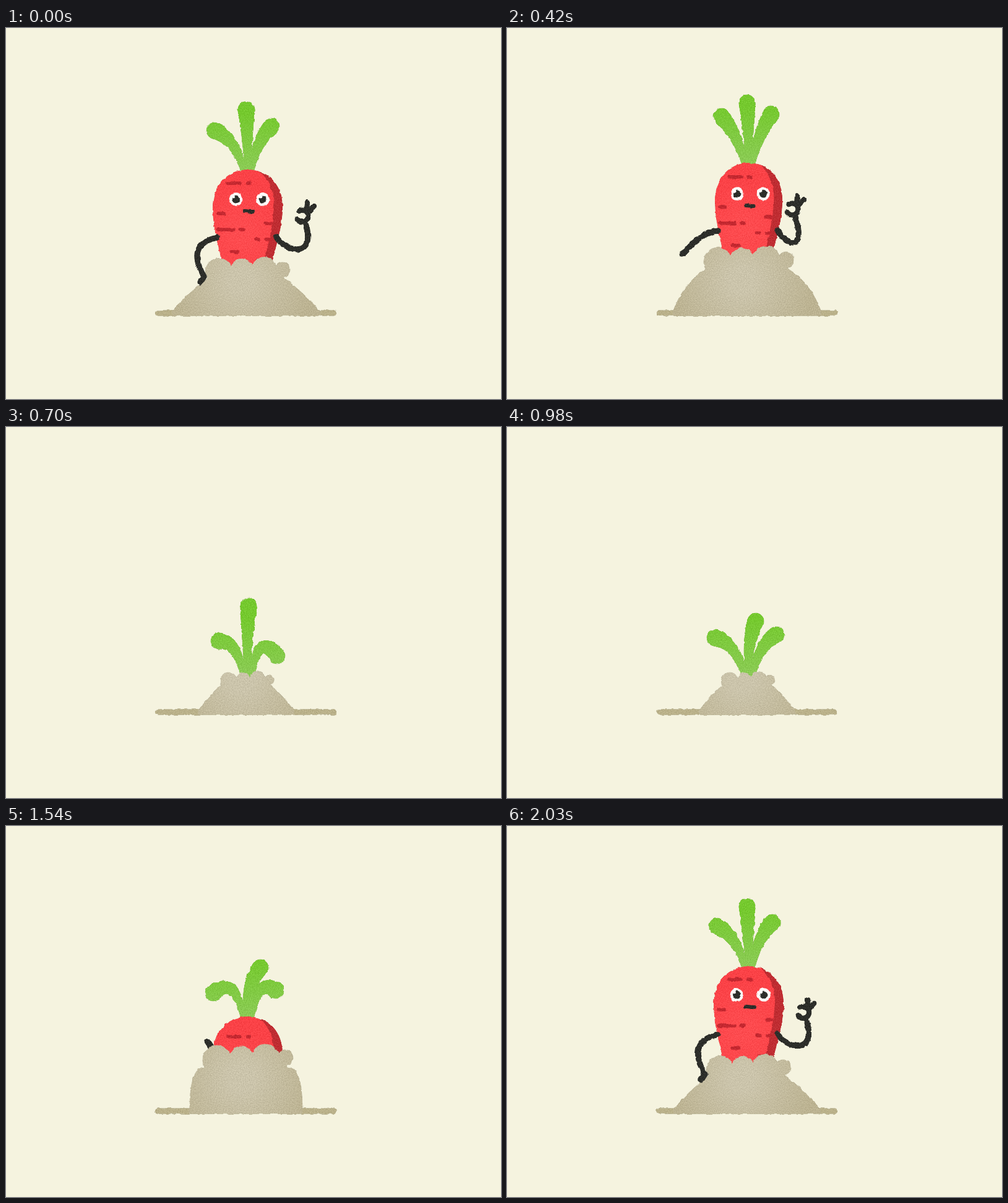
An HTML page with a canvas that plays this animation: 800x600 px, repeating every 2100 ms.

```html
<!DOCTYPE html>
<html lang="en">
<head>
<meta charset="utf-8">
<title>Shy radish</title>
<style>
  html, body { margin: 0; width: 100%; height: 100%; overflow: hidden; background: #f5f3df; }
  canvas { display: block; filter: url(#crayon); }
  svg { position: absolute; width: 0; height: 0; }
</style>
</head>
<body>
<canvas id="stage" width="800" height="600"></canvas>
<svg aria-hidden="true">
  <filter id="crayon" filterUnits="userSpaceOnUse" x="0" y="0" width="800" height="600" color-interpolation-filters="sRGB">
    <feTurbulence id="wobble" type="fractalNoise" baseFrequency="0.13" numOctaves="2" result="waves"/>
    <feDisplacementMap in="SourceGraphic" in2="waves" scale="4" xChannelSelector="R" yChannelSelector="G" result="rough"/>
    <feTurbulence id="grain" type="fractalNoise" baseFrequency="0.6" numOctaves="2"/>
    <feColorMatrix values="1 0 0 0 0  1 0 0 0 0  1 0 0 0 0  0 0 0 0 1" result="grey"/>
    <feComposite in="rough" in2="grey" operator="arithmetic" k2="1" k3="0.18" k4="-0.09"/>
    <feComposite in2="rough" operator="in"/>
  </filter>
</svg>
<script>
const ctx = document.getElementById('stage').getContext('2d');
const wobble = document.getElementById('wobble');
const grain = document.getElementById('grain');
const LOOP = 2100, STEP = 70, MID = 388;
const INK = '#2d2e2a', WHITE = '#fffdfa';

const smooth = u => u * u * (3 - 2 * u);
const speedUp = u => u * u;
const slowDown = u => 1 - (1 - u) ** 3;
const spring = u => 1 - Math.cos(3 * Math.PI * u) * (1 - u) ** 2;

// Leaf tips are measured from the top of the root.
const stand = {
  head: 229, eye: 48, wide: 1,
  heap: { y: 393, size: 1, half: 120, bulge: .1 },
  leaves: { left: [-53, -63], mid: [-2, -97], right: [39, -70] },
  elbow: [290, 350], hand: [320, 402], tilt: 9,
  wrist: [484, 316], reach: 1
};
const stretch = {
  ...stand, head: 218, eye: 50, wide: .965,
  heap: { y: 377, size: 1.07, half: 120, bulge: .35 },
  leaves: { left: [-43, -75], mid: [-2, -97], right: [37, -79] },
  elbow: [313, 331], hand: [289, 361], tilt: 4, wrist: [466, 305]
};
const buried = {
  ...stand, head: 410, eye: 75,
  heap: { y: 410, size: .64, half: 77.5, bulge: .12 },
  leaves: { left: [-46, -55], mid: [2, -111], right: [48, -31] },
  elbow: [330, 400], hand: [340, 420], wrist: [440, 420]
};
const waiting = {
  ...buried, leaves: { left: [-54, -60], mid: [12, -87], right: [45, -65] }
};
const burst = {
  ...buried, head: 308,
  heap: { y: 377, size: 1.07, half: 91.5, bulge: 1 },
  leaves: { left: [-55, -38], mid: [21, -79], right: [46, -42] },
  elbow: [335, 390], hand: [331, 357], tilt: -9, wrist: [430, 402], reach: 0
};
const peak = {
  ...stand, head: 215, eye: 36.5,
  heap: { y: 387, size: 1, half: 114, bulge: .15 },
  leaves: { left: [-36, -75], mid: [-2, -95], right: [34, -76] },
  elbow: [288, 343], hand: [319, 399], wrist: [482, 299], reach: .15
};

const moves = [
  { end: 420, from: stand, to: stretch, ease: smooth },
  { end: 700, from: stretch, to: buried, ease: smooth },
  { end: 1260, from: buried, to: waiting, ease: spring },
  { end: 1540, from: waiting, to: burst, ease: speedUp },
  { end: 1820, from: burst, to: peak, ease: slowDown },
  { end: LOOP, from: peak, to: stand, ease: smooth }
];

function blend(a, b, k) {
  if (typeof a === 'number') return a + (b - a) * k;
  const out = Array.isArray(a) ? [] : {};
  for (const key in a) out[key] = blend(a[key], b[key], k);
  return out;
}

function poseAt(t) {
  const i = moves.findIndex(m => t < m.end);
  const start = i ? moves[i - 1].end : 0;
  const { from, to, ease, end } = moves[i];
  return blend(from, to, ease((t - start) / (end - start)));
}

function dot(x, y, r, color) {
  ctx.fillStyle = color;
  ctx.beginPath();
  ctx.arc(x, y, r, 0, Math.PI * 2);
  ctx.fill();
}

function pen(color, width) {
  ctx.strokeStyle = color;
  ctx.lineWidth = width;
  ctx.beginPath();
}

function line(x1, y1, x2, y2) {
  ctx.moveTo(x1, y1);
  ctx.lineTo(x2, y2);
}

function clipAbove(y, paint) {
  ctx.save();
  ctx.beginPath();
  ctx.rect(0, 0, 800, y);
  ctx.clip();
  paint();
  ctx.restore();
}

// A tapered stroke from the base over a bend to the tip.
function leaf(x, y, [tx, ty], bx, by, color) {
  for (let u = 0; u <= 1; u += 1 / 64) {
    const v = 1 - u;
    dot(x * v * v + 2 * u * v * (390 + bx) + u * u * (390 + tx),
        y + 2 * u * v * by + u * u * ty, 4.5 + 9 * u, color);
  }
}

function leaves({ left, mid, right }, y) {
  const green = ctx.createLinearGradient(0, y, 0, y - 90);
  green.addColorStop(0, '#8bcb55');
  green.addColorStop(1, '#75c92e');
  // the lower a side tip hangs, the higher its leaf arches
  const arch = ty => -92 - .68 * ty;
  leaf(383, y, left, left[0] * .35, arch(left[1]), green);
  leaf(397, y, right, right[0] * .35, arch(right[1]), green);
  leaf(390, y, mid, mid[0] * -.2, mid[1] * .58, green);
}

function root({ head, eye, wide }) {
  ctx.save();
  ctx.translate(390, head);
  ctx.scale(wide, 1);
  ctx.translate(-390, 0);

  const red = ctx.createRadialGradient(380, 105, 15, 380, 105, 80);
  red.addColorStop(0, '#ff4b4f');
  red.addColorStop(1, '#fb4247');
  ctx.fillStyle = red;
  ctx.beginPath();
  ctx.moveTo(391, 0);
  ctx.bezierCurveTo(358, 0, 334, 25, 334, 62);
  ctx.bezierCurveTo(334, 98, 345, 128, 349, 152);
  ctx.lineTo(360, 190);
  ctx.lineTo(420, 190);
  ctx.lineTo(430, 152);
  ctx.bezierCurveTo(435, 125, 447, 96, 447, 60);
  ctx.bezierCurveTo(447, 25, 424, 0, 391, 0);
  ctx.fill();
  ctx.clip();

  ctx.fillStyle = '#bf2d32';
  ctx.beginPath();
  ctx.moveTo(401, -3);
  ctx.bezierCurveTo(428, 12, 436, 45, 432, 70);
  ctx.bezierCurveTo(430, 105, 420, 130, 414, 165);
  ctx.lineTo(460, 165);
  ctx.lineTo(460, -3);
  ctx.fill();

  // the marks roll along with the face, but less
  const roll = (eye - 48) * .4;
  pen('#c42830', 5.5);
  [[358, 378, 22], [390, 394, 22], [343, 352, 71], [342, 368, 97], [378, 383, 97], [364, 375, 133],
   [419, 428, 87], [404, 409, 113], [420, 426, 113], [407, 416, 146]]
    .forEach(([a, b, y]) => line(a, y + roll, b, y + roll));
  ctx.stroke();

  for (const x of [371.5, 415]) {
    dot(x, eye, 10.8, WHITE);
    dot(x, eye, 6.5, INK);
    dot(x - 4, eye - 4, 2.4, WHITE);
  }
  pen(INK, 6);
  line(386, eye + 19, 399, eye + 20);
  ctx.stroke();
  ctx.restore();
}

function arms({ head, elbow, hand, tilt, wrist, reach }) {
  const [hx, hy] = hand, [wx, wy] = wrist;
  pen(INK, 9.5);
  ctx.moveTo(341, head + 110);
  ctx.quadraticCurveTo(...elbow, hx, hy);
  ctx.lineTo(hx - 6, hy + tilt);
  ctx.moveTo(437, head + 109);
  ctx.bezierCurveTo(451, head + 133, wx + 18, wy + 58, wx, wy);
  ctx.stroke();

  // pinched thumb and finger, then the raised fingers
  const x = wx - 5, y = wy - 12;
  pen(INK, 8.5);
  ctx.arc(x, y, 9.5, Math.PI * .83, Math.PI * 1.3, true);
  line(x + 7, y - 7, x + 5 + 3 * reach, y - 10 - 12 * reach);
  line(x + 9, y - 5, x + 9 + 10 * reach, y - 6 - 10 * reach);
  ctx.stroke();
}

function mound({ y, size, half, bulge }) {
  const soil = ctx.createRadialGradient(380, 408, 20, 380, 408, 115);
  soil.addColorStop(0, '#cbc4ab');
  soil.addColorStop(1, '#bcb392');

  pen('#bab18a', 9.5);
  line(245.5, 461, 529.5, 461);
  ctx.stroke();

  const neck = 63 * size, top = y + 12 * size, foot = 458;
  const out = (1 + bulge) / 2;
  const bx = neck + (half - neck) * out, by = foot + (top - foot) * out;
  ctx.fillStyle = soil;
  for (const side of [-1, 1]) {
    ctx.beginPath();
    ctx.moveTo(MID, 465);
    ctx.lineTo(MID + side * half, 465);
    ctx.lineTo(MID + side * half, foot);
    ctx.quadraticCurveTo(MID + side * bx, by, MID + side * neck, top);
    ctx.lineTo(MID + side * 50 * size, y);
    ctx.lineTo(MID - side * 2, y);
    ctx.lineTo(MID - side * 2, 465);
    ctx.fill();
  }
  for (const [cx, cy, r] of [[-44, 1, 22], [-7, -2, 18], [29, -2, 21], [59, -2, 12.5]])
    dot(MID + cx * size, y + cy * size, r * size, soil);
}

function draw(t) {
  const pose = poseAt(t), { head, heap } = pose;
  const armsFree = head < 260;
  ctx.clearRect(0, 0, 800, 600);
  ctx.lineCap = ctx.lineJoin = 'round';

  clipAbove(heap.y + 3, () => {
    if (!armsFree && head < 320) arms(pose);
    leaves(pose.leaves, Math.min(head, 401));
    if (head < heap.y) root(pose);
  });
  mound(heap);
  if (armsFree) arms(pose);
}

let last = -1;
function tick(now) {
  const n = Math.floor((now % LOOP) / STEP);
  if (n !== last) {
    last = n;
    wobble.setAttribute('seed', n + 1);
    grain.setAttribute('seed', n + 50);
    draw(n * STEP);
  }
  requestAnimationFrame(tick);
}
tick(0);
</script>
</body>
</html>
```
